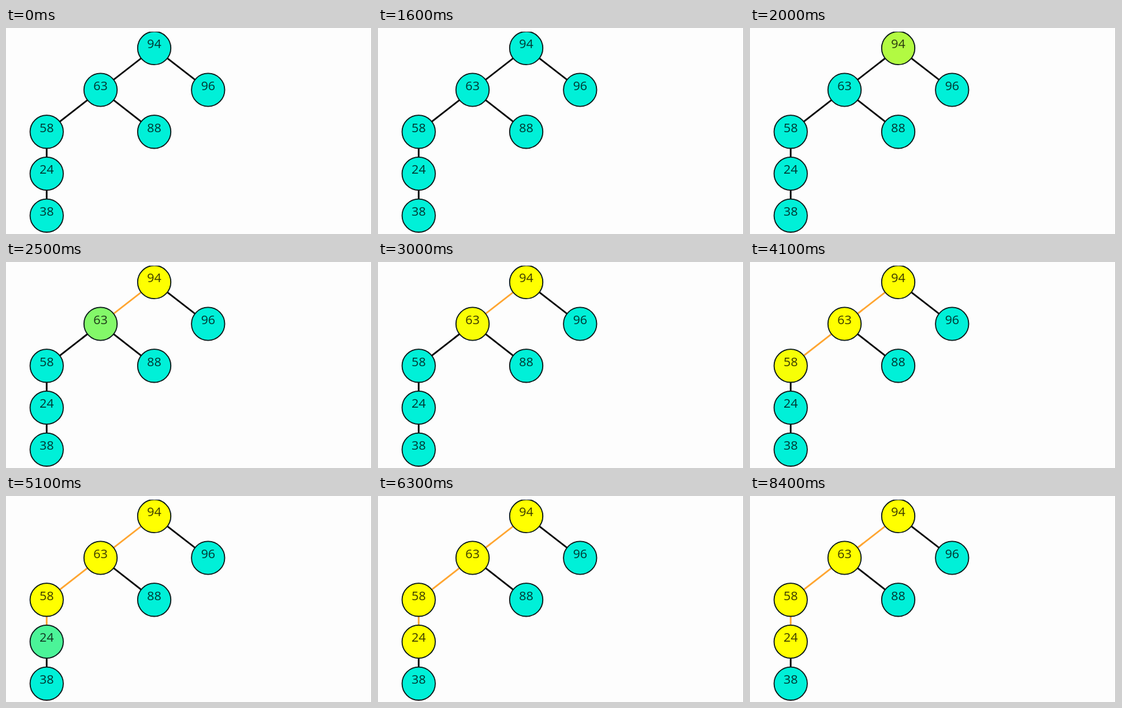
An HTML page for the animation above (9.8 s loop, 600 by 338 pixels).

```html
<!DOCTYPE html>
<html>
<head>
<meta charset="utf-8">
<style>
html, body { margin: 0; height: 100%; overflow: hidden; background: #fdfdfd; }
svg { display: block; width: 600px; height: 338px; }
line { stroke-width: 2.8; }
circle { stroke: #0b1a1a; stroke-width: 1.8; }
text { font: 20.4px "Open Sans", "Noto Sans", sans-serif; text-anchor: middle; fill: #000; fill-opacity: .78; }
</style>
</head>
<body>
<svg viewBox="0 0 600 338">
  <clipPath id="top"><rect y="6" width="600" height="332"/></clipPath>
  <g id="tree" clip-path="url(#top)"></g>
  <rect x="599" width="1" height="338" fill="#b4b4b4"/>
</svg>
<script>
const LOOP = 9800, TICK = 100, FADE = 1000;
const TEAL = [0, 240, 216], YELLOW = [255, 255, 0];

// start: when the node begins to turn yellow and its parent edge turns orange
const nodes = [
  { label: 94, x: 243, y: 33, start: 1590 },
  { label: 63, x: 155, y: 101.5, parent: 0, start: 2200 },
  { label: 96, x: 331.3, y: 101.5, parent: 0 },
  { label: 58, x: 66.7, y: 170.3, parent: 1, start: 3320 },
  { label: 88, x: 243, y: 170.3, parent: 1 },
  { label: 24, x: 66.7, y: 239, parent: 3, start: 4900 },
  { label: 38, x: 66.7, y: 307.8, parent: 5 }
];

const tree = document.getElementById("tree");
function add(tag, attrs) {
  const el = document.createElementNS("http://www.w3.org/2000/svg", tag);
  for (const key in attrs) el.setAttribute(key, attrs[key]);
  return tree.appendChild(el);
}

for (const n of nodes) {
  const p = nodes[n.parent];
  if (p) n.edge = add("line", { x1: p.x, y1: p.y, x2: n.x, y2: n.y });
}
for (const n of nodes) {
  n.disc = add("circle", { cx: n.x, cy: n.y, r: 27.2 });
  add("text", { x: n.x, y: n.y + 0.2 }).textContent = n.label;
}

// cubic-bezier(.25, .1, .25, 1)
function ease(t) {
  if (t <= 0) return 0;
  if (t >= 1) return 1;
  const curve = (s, a, b) => 3 * (1 - s) ** 2 * s * a + 3 * (1 - s) * s * s * b + s ** 3;
  let lo = 0, hi = 1;
  for (let i = 0; i < 20; i++) {
    const mid = (lo + hi) / 2;
    if (curve(mid, .25, .25) < t) lo = mid; else hi = mid;
  }
  return curve(lo, .1, 1);
}

function draw(now) {
  const t = Math.floor(now % LOOP / TICK) * TICK;
  for (const { start = Infinity, disc, edge } of nodes) {
    const k = ease((t - start) / FADE);
    const rgb = TEAL.map((c, i) => Math.round(c + (YELLOW[i] - c) * k));
    disc.setAttribute("fill", `rgb(${rgb})`);
    if (edge) edge.setAttribute("stroke", t >= start ? "#ffa530" : "#080808");
  }
}

const origin = performance.now();
function frame() {
  draw(performance.now() - origin);
  requestAnimationFrame(frame);
}
frame();
</script>
</body>
</html>
```
